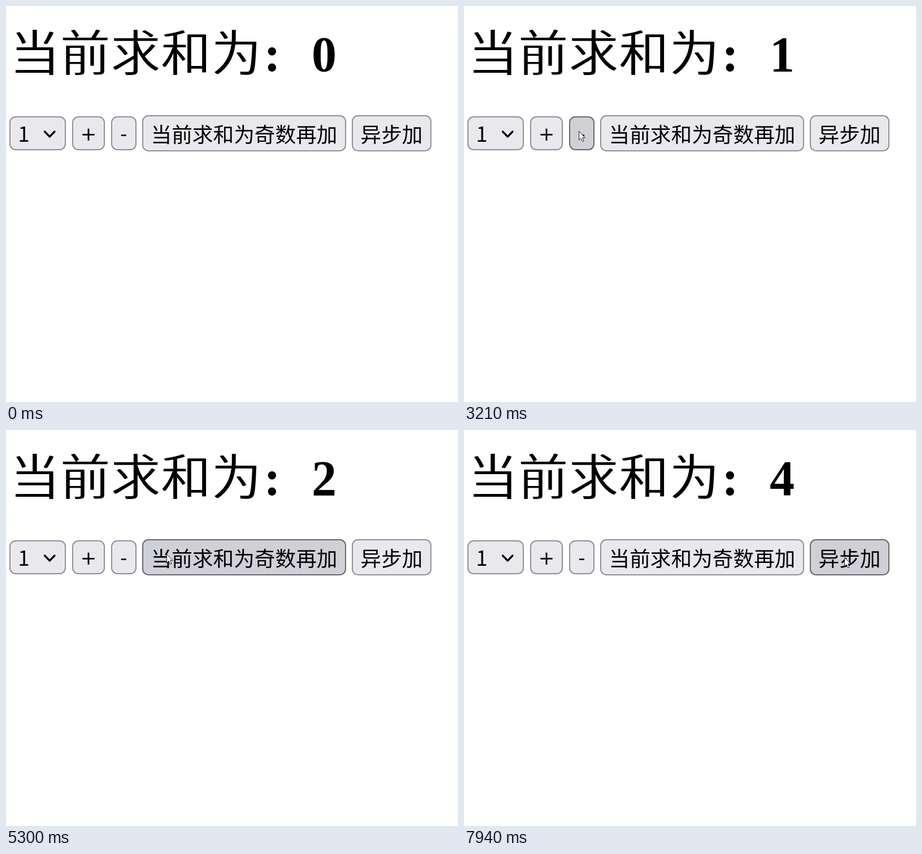
Write an HTML page that moves like this. It is 800 px wide and 700 px high and loops after 8 s.

```html
<!DOCTYPE html>
<html lang="zh-CN">
<head>
<meta charset="utf-8">
<title>求和</title>
<style>
  html, body { margin: 0; width: 100%; height: 100%; overflow: hidden; background: #fff; }
  svg { display: block; width: 800px; height: 700px; }
  text { font: 36.67px "Noto Sans CJK SC", "Noto Sans CJK", sans-serif; }
  /* White outline thins the strokes; the shifted copy thickens the verticals again. */
  .title { font-size: 88px; letter-spacing: 1.2px; stroke: #fff; stroke-width: 1.8; }
  .copy { mix-blend-mode: multiply; }
  .bold { font: bold 88px "Liberation Serif", serif; }
  .label { text-anchor: middle; }
  .sign { font-family: "DejaVu Sans", sans-serif; font-size: 34px; }
  .btn { fill: #e9e9ed; stroke: #8f8f9d; stroke-width: 2; }
  .btn.hover { fill: #d0d0d7; stroke: #676774; }
  .btn.active { fill: #b1b1b9; stroke: #484851; }
</style>
</head>
<body>
<svg viewBox="0 0 800 700">
  <text class="title" id="title" x="6" y="114.5">当前求和为</text>
  <use class="copy" href="#title" x="2"/>
  <text class="bold" x="456.5" y="114.5">:</text>
  <text class="bold" id="sum" x="541" y="114.5">0</text>
  <g id="buttons"></g>
  <path d="M68.5 222L77.3 231L86 222" fill="none" stroke="#000" stroke-width="3.4" stroke-linecap="round" stroke-linejoin="round"/>
  <g id="pointer">
    <circle id="press" cy="1" r="11.7" fill="#e4e03c" fill-opacity=".7"/>
    <path d="M.5 .5V16L4 12.7L6.5 18.5L9 17.4L6.6 11.8H11.3Z" fill="#fff" stroke="#222"/>
  </g>
</svg>
<script>
const LOOP = 8000, ENTER = 160, STEP = 80, HOLD = 165, MIDDLE = 225;
const $ = id => document.getElementById(id);

// Each button's act turns the old sum into the new one.
const buttons = [
  { x: 6, w: 100, label: '1', labelX: 31.5 },
  { x: 117, w: 58, label: '+', act: n => n + 1 },
  { x: 186, w: 45, label: '-', act: n => n - 1 },
  { x: 241, w: 361, label: '当前求和为奇数再加', act: n => n % 2 ? n + 1 : n },
  { x: 612, w: 141, label: '异步加' }
];

function add(name, attrs, text = '') {
  const el = document.createElementNS('http://www.w3.org/2000/svg', name);
  for (const k in attrs) el.setAttribute(k, attrs[k]);
  el.textContent = text;
  return $('buttons').appendChild(el);
}

for (const b of buttons) {
  const wide = b.label.length > 1, sign = '+-'.includes(b.label);
  b.h = wide ? 64 : 60;
  b.y = MIDDLE - b.h / 2;
  b.rect = add('rect', { x: b.x + 1, y: b.y + 1, width: b.w - 2, height: b.h - 2, rx: 10 });
  add('text', {
    class: sign ? 'label sign' : 'label',
    x: b.labelX || b.x + b.w / 2,
    y: MIDDLE + (wide ? 16 : sign ? 13 : 14.5)
  }, b.label);
}

// The pointer glides to each stop, arriving at the given time.
const start = { x: 619, y: 622 };
const stops = [
  { at: 960, travel: 800, x: 131, y: 236 },
  { at: 2500, travel: 300, x: 203, y: 221 },
  { at: 3380, travel: 170, x: 160, y: 222 },
  { at: 3800, travel: 250, x: 317, y: 219 },
  { at: 5800, travel: 740, x: 163, y: 218 },
  { at: 6530, travel: 400, x: 542, y: 229 },
  { at: 7010, travel: 160, x: 673, y: 225 }
];
const clicks = [1370, 2040, 2630, 4050, 4900, 5950, 6530, 7350];

const ease = k => k * k * (3 - 2 * k);
const mix = (a, b, k) => Math.round(a + (b - a) * k);

function pointerAt(time) {
  const t = Math.floor(time / STEP) * STEP;
  return stops.reduce((p, s) => {
    const k = ease(Math.min(1, Math.max(0, 1 - (s.at - t) / s.travel)));
    return { x: mix(p.x, s.x, k), y: mix(p.y, s.y, k) };
  }, start);
}

function buttonAt({ x, y }) {
  return buttons.find(b => x >= b.x && x < b.x + b.w && y >= b.y && y < b.y + b.h);
}

function sumAt(t) {
  return clicks.filter(c => c + HOLD <= t).reduce((n, c) => {
    const b = buttonAt(pointerAt(c));
    return b && b.act ? b.act(n) : n;
  }, 0);
}

function draw(t) {
  const p = pointerAt(t);
  const over = buttonAt(p);
  const down = clicks.some(c => t >= c && t < c + HOLD);

  $('sum').textContent = sumAt(t);
  $('pointer').setAttribute('transform', `translate(${p.x} ${p.y})`);
  $('pointer').style.display = t < ENTER ? 'none' : '';
  $('press').style.display = down ? '' : 'none';
  for (const b of buttons) {
    const state = b !== over ? '' : down ? ' active' : ' hover';
    b.rect.setAttribute('class', 'btn' + state);
  }
}

function loop() {
  draw(performance.now() % LOOP);
  requestAnimationFrame(loop);
}
loop();
</script>
</body>
</html>
```
